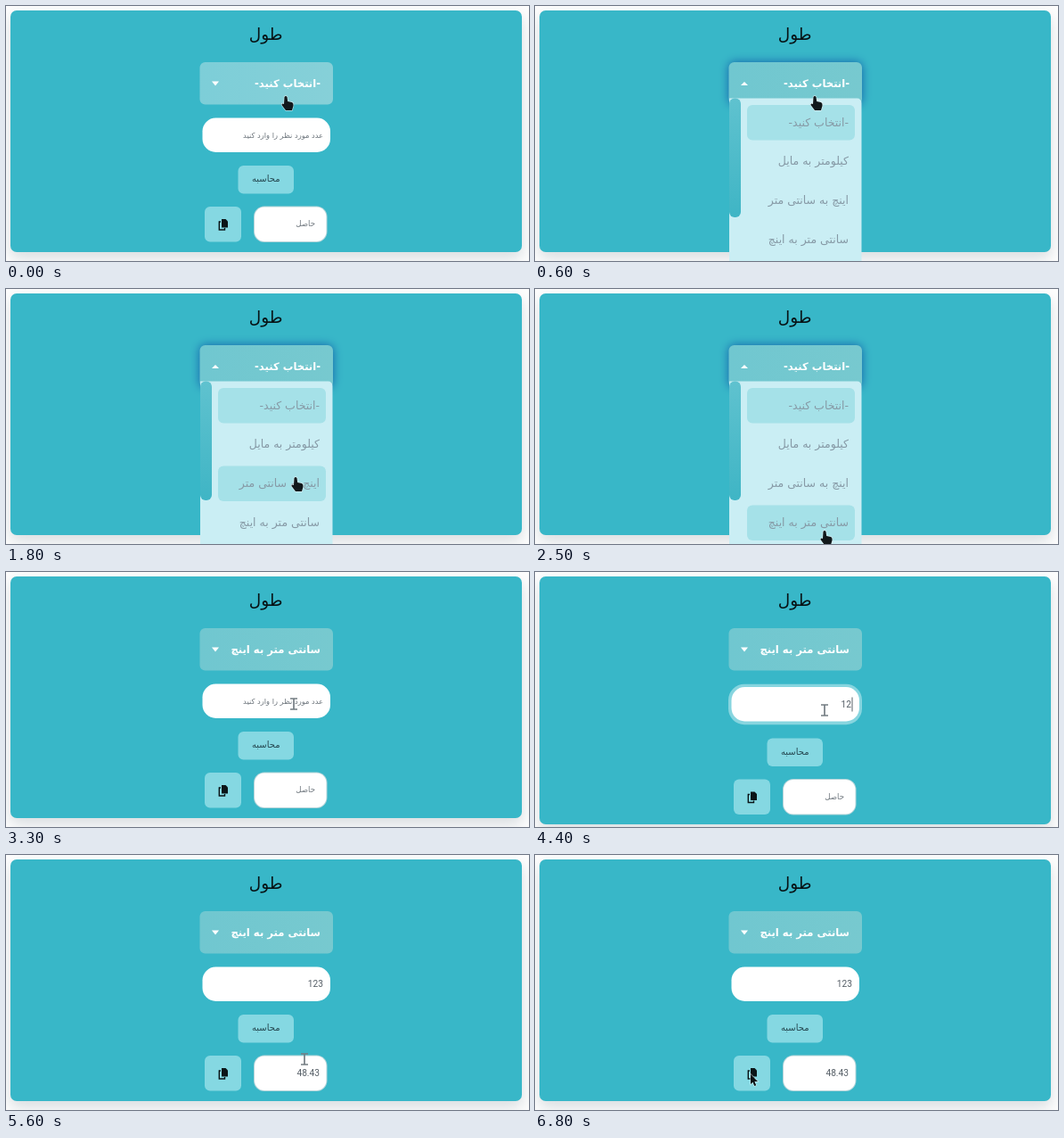
An HTML page with a canvas for the animation above (6900 ms loop, 587 by 286 pixels).

```html
<!DOCTYPE html>
<html lang="fa">
<head>
<meta charset="utf-8">
<style>
html, body { margin: 0; width: 100%; height: 100%; overflow: hidden; background: #fdfdfd; }
canvas { display: block; width: 587px; height: 286px; }
</style>
</head>
<body>
<canvas id="stage"></canvas>
<script>
const LOOP = 6900, STEP = 100, W = 587, H = 286;
const OPEN = 400, CLOSE = 2700, FOCUS = 3400, BLUR = 5200;
const KEYS = [4200, 4400, 4700];
const FA = '"DejaVu Sans", sans-serif', LATIN = 'Roboto, sans-serif';
const PROMPT = '-انتخاب کنید-';
const ITEMS = [PROMPT, 'کیلومتر به مایل', 'اینچ به سانتی متر', 'سانتی متر به اینچ'];

// Pointer hot spot: time, x, y
const PATH = [
  [0, 314, 101], [600, 314, 101], [1000, 323, 140], [1300, 325, 188], [1600, 325, 190],
  [2000, 325, 232], [2400, 325, 271], [2800, 325, 271], [3300, 323, 148], [3700, 325, 155],
  [4900, 325, 155], [5150, 296, 198], [5300, 296, 198], [5600, 335, 229], [5700, 335, 229],
  [6200, 242, 246], [LOOP, 242, 246]
];

const canvas = document.getElementById('stage');
const c = canvas.getContext('2d');
const dpr = window.devicePixelRatio || 1;
canvas.width = W * dpr;
canvas.height = H * dpr;

function box(x, y, w, h, r, fill) {
  c.beginPath();
  c.roundRect(x, y, w, h, r);
  c.fillStyle = fill;
  c.fill();
}

function shape(points, fill, outline) {
  c.beginPath();
  points.forEach(([x, y]) => c.lineTo(x, y));
  c.closePath();
  if (outline) {
    c.strokeStyle = outline;
    c.lineWidth = 1.4;
    c.stroke();
  }
  c.fillStyle = fill;
  c.fill();
}

function glow(color, blur, dy, draw) {
  c.save();
  c.shadowColor = color;
  c.shadowBlur = blur * dpr;
  c.shadowOffsetY = dy * dpr;
  draw();
  c.restore();
}

function text(str, x, y, size, color, family = FA, weight = '', align = 'right') {
  c.font = `${weight} ${size}px ${family}`;
  c.textAlign = align;
  c.direction = family === FA ? 'rtl' : 'ltr';
  c.fillStyle = color;
  c.fillText(str, x, y);
}

function blend(from, to, amount) {
  const g = c.createLinearGradient(217, 0, 367, 0);
  g.addColorStop(0, from);
  g.addColorStop(amount, to);
  return g;
}

function pointerAt(t) {
  const i = PATH.findIndex(p => p[0] > t);
  const [t0, x0, y0] = PATH[i - 1], [t1, x1, y1] = PATH[i];
  const k = (t - t0) / (t1 - t0), e = k * k * (3 - 2 * k);
  return [x0 + (x1 - x0) * e, y0 + (y1 - y0) * e];
}

const inside = (x, y, l, top, r, b) => x >= l && x <= r && y >= top && y <= b;

function drawHand(x, y) {
  c.save();
  c.translate(x, y);
  c.beginPath();
  c.moveTo(-1.5, 1);
  c.quadraticCurveTo(0, -1.2, 1.5, 1);
  c.lineTo(2.2, 6);
  c.lineTo(7, 7);
  c.quadraticCurveTo(9, 8, 8.5, 11);
  c.lineTo(7, 16);
  c.lineTo(0, 16);
  c.lineTo(-4.5, 10);
  c.quadraticCurveTo(-4.5, 7.5, -2, 9);
  c.closePath();
  c.strokeStyle = 'rgba(235,245,247,.65)';
  c.lineWidth = 1.4;
  c.stroke();
  c.fillStyle = '#11181b';
  c.fill();
  c.restore();
}

function drawArrow(x, y) {
  const points = [[0, 0], [0, 11], [2.5, 8.8], [4.3, 13], [6.2, 12.2], [4.4, 8], [8, 8]];
  shape(points.map(([a, b]) => [x + a, y + b]), '#0c1114', 'rgba(235,245,247,.6)');
}

function drawBeam(x, y) {
  c.beginPath();
  c.moveTo(x - 4, y - 6);
  c.lineTo(x + 4, y - 6);
  c.moveTo(x, y - 6);
  c.lineTo(x, y + 6);
  c.moveTo(x - 4, y + 6);
  c.lineTo(x + 4, y + 6);
  c.strokeStyle = '#747d83';
  c.lineWidth = 1.7;
  c.stroke();
}

function drawCopyIcon(y) {
  shape([[242, y], [246.5, y], [249, y + 2.5], [249, y + 9.5], [242, y + 9.5]], '#0b1518');
  c.beginPath();
  c.moveTo(241, y + 3);
  c.lineTo(239.3, y + 3);
  c.lineTo(239.3, y + 12);
  c.lineTo(245.5, y + 12);
  c.lineTo(245.5, y + 10);
  c.strokeStyle = '#0b1518';
  c.lineWidth = 1.4;
  c.stroke();
}

function drawSelect(open, hover, label, t) {
  const fill = hover ? blend('#7dced8', '#86d0d8', 1) : blend('#70c7d0', '#77c9cf', 1);
  const draw = () => box(217.5, 63, 149.5, 47.5, 6, fill);
  if (open) {
    const strength = Math.min(1, (t - OPEN + STEP) / 300);
    glow(`rgba(20,95,170,${strength})`, 11, 0, draw);
  } else draw();
  text(label, 353, 90.5, 11.6, '#fff', FA, 'bold');
  const [base, tip] = open ? [89, 85] : [84.5, 89.5];
  shape([[231, base], [239, base], [235, tip]], '#fff');
}

function drawForm(t, focused) {
  const shift = focused ? 7.5 : 0, y = focused ? 129 : 125.5;
  if (focused) box(217, y - 3.3, 150, 45.5, 18, '#87d5df');
  box(220.5, y, 143.5, 38.5, 15, '#fff');

  const typed = '123'.slice(0, KEYS.filter(k => t >= k).length);
  if (typed) text(typed, focused ? 355 : 356, y + 22.5, 10.2, '#555e66', LATIN);
  else text('عدد مورد نظر را وارد کنید', 356, y + 22.5, 8.3, '#6d757c');
  if (focused && (t - FOCUS) % 1000 < 500 || focused && t >= KEYS[0]) {
    box(355.5, y + 11.5, 1, 16, 0, '#59636a');
  }

  box(260.5, 179 + shift, 62.5, 31.5, 6, '#85d8e2');
  text('محاسبه', 291.7, 197 + shift, 10, '#24454e', FA, '', 'center');

  box(223, 225 + shift, 41, 39.5, 6, '#85d8e2');
  drawCopyIcon(239 + shift);

  box(278, 224.5 + shift, 82.5, 40.5, 12, '#b5d5da');
  box(279, 225.5 + shift, 80.5, 38.5, 11, '#fff');
  if (t >= BLUR) text('48.43', 352, 248, 10.2, '#555e66', LATIN);
  else text('حاصل', 347, 247 + shift, 8.6, '#6d757c');
}

function drawMenu(x, y) {
  box(218, 103.5, 148.5, 200, [0, 5, 0, 0], '#caeef4');
  const bar = c.createLinearGradient(0, 103, 0, 237);
  bar.addColorStop(0, '#5fc2cf');
  bar.addColorStop(1, '#3fb5c5');
  box(218, 103.5, 13, 133.5, 6, bar);
  ITEMS.forEach((item, i) => {
    const top = 111 + i * 43.8;
    const lit = inside(x, y, 238, top, 359, top + 39.5);
    if (i === 0 || lit) box(238, top, 121, 39.5, 6, '#a5e1e8');
    text(item, 352, top + 23.5, 12.5, '#8699a5');
  });
}

function draw(t) {
  const open = t >= OPEN && t < CLOSE;
  const focused = t >= FOCUS && t < BLUR;
  const [x, y] = pointerAt(t);
  const onSelect = inside(x, y, 217, 63, 367, 110);

  c.setTransform(dpr, 0, 0, dpr, 0, 0);
  c.fillStyle = '#fdfdfd';
  c.fillRect(0, 0, W, H);
  glow('rgba(70,95,110,.2)', 16, 7, () =>
    box(5, 5, 574, focused ? 278 : 271, 7, '#38b7c8'));

  text('طول', 291.7, 38, 18.5, '#071316', FA, '', 'center');
  drawForm(t, focused);
  drawSelect(open, onSelect && !open, t < CLOSE ? PROMPT : ITEMS[3], t);
  if (open) drawMenu(x, y);

  const onField = inside(x, y, 220, 125, 364, 168) || inside(x, y, 278, 225, 360, 265);
  if (open || onSelect) drawHand(x, y);
  else if (onField) drawBeam(x, y);
  else drawArrow(x, y);
}

function tick() {
  const t = performance.now() % LOOP;
  draw(Math.floor(t / STEP) * STEP);
  requestAnimationFrame(tick);
}
tick();
</script>
</body>
</html>
```
